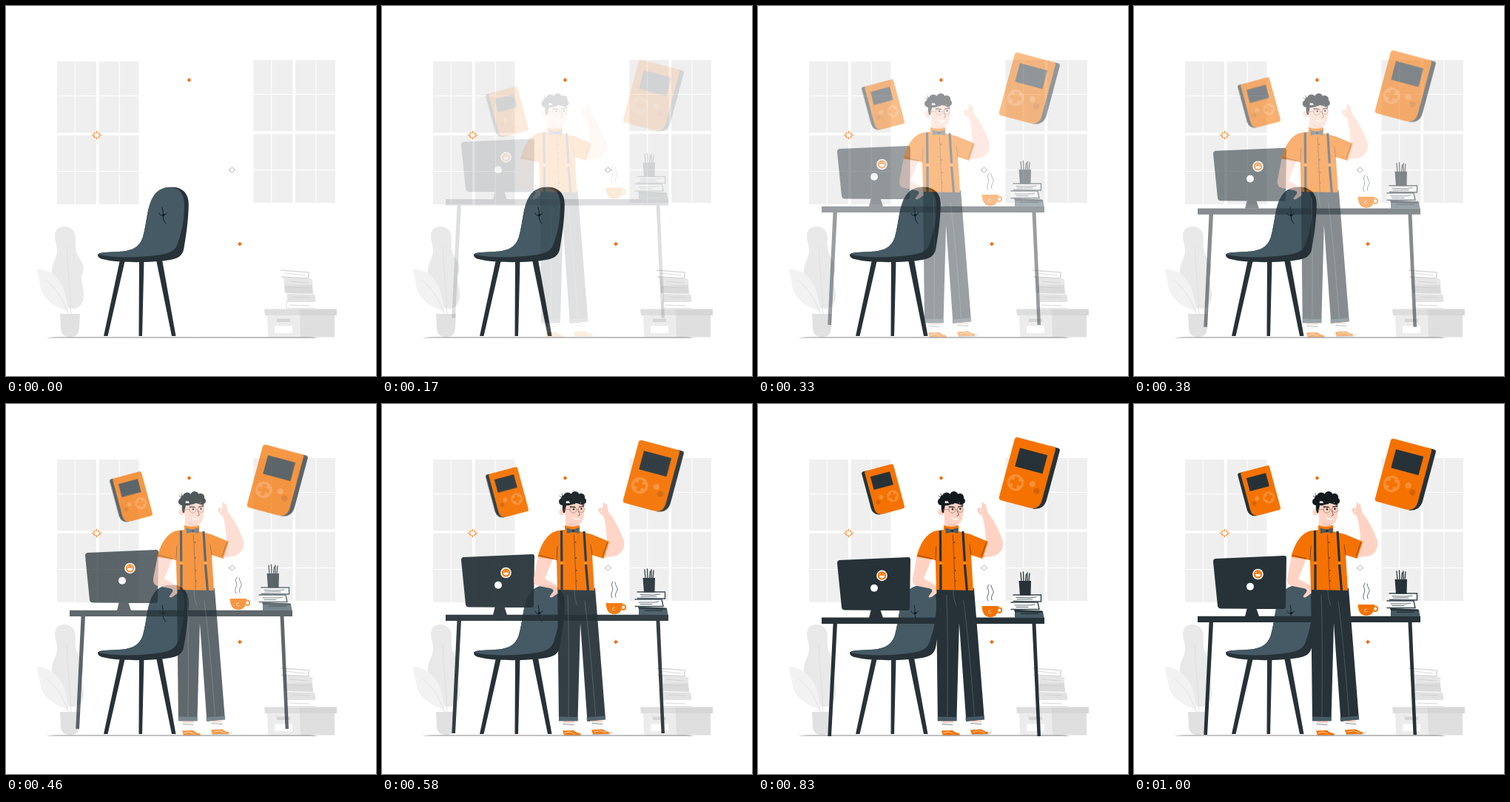
An HTML page for the animation above (1040 ms loop, 500 by 500 pixels).

```html
<!DOCTYPE html>
<html lang="en">
<head>
<meta charset="utf-8">
<title>Desk scene</title>
<style>
html, body { margin: 0; width: 100%; height: 100%; overflow: hidden; background: #fff; }
svg { display: block; width: 100vw; height: 100vh; }
.line { fill: none; stroke-linecap: round; stroke-linejoin: round; }
.ink { fill: #263238; }
.slate { fill: #455a64; }
.orange { fill: #f57200; }
.skin { fill: #ffd3c3; }
</style>
</head>
<body>
<svg viewBox="0 0 500 500">
<defs>
  <g id="window">
    <path fill="#efefef" d="M69 75H179.5V268H69Z"/>
    <path class="line" stroke="#fff" stroke-width="1.1" d="M93.2 75V268M153.3 75V268M69 121.5H180M69 223.5H180"/>
    <path class="line" stroke="#fff" stroke-width="3.6" d="M123.8 75V268M69 173H180"/>
  </g>
  <path id="star" fill="#f26500" d="M0-3.2Q.7-.7 3.2 0Q.7.7 0 3.2Q-.7.7-3.2 0Q-.7-.7 0-3.2Z"/>
  <g id="console">
    <path class="ink" d="M50 0H60Q63 0 63 3V73Q62 86 48 88Z"/>
    <path class="orange" d="M4 0H54Q57 0 57 3V74Q57 88 43 88H4Q0 88 0 84V4Q0 0 4 0Z"/>
    <rect class="ink" x="10" y="13" width="38.5" height="26"/>
    <circle cx="16.5" cy="59.8" r="11.3" fill="#f88f36"/>
    <path class="orange" d="M13.7 52H19.3V57H24.3V62.6H19.3V67.6H13.7V62.6H8.7V57H13.7Z"/>
    <circle cx="38.8" cy="55.9" r="4.2" fill="#f88f36"/>
    <circle cx="46.6" cy="63.6" r="4.2" fill="#d56200"/>
  </g>
</defs>

<!-- room -->
<use href="#window"/>
<use href="#window" x="265.5" y="-2"/>
<g>
  <path fill="#e9e9e9" d="M66 310C66 301 73 298 80 298C89 299 94 305 94 314C93 326 94 334 100 342C106 350 106 357 102 365C101 374 106 382 105 393C104 405 96 410 88 409C80 408 76 400 77 391C78 381 64 376 62 363C60 350 69 342 69 331C69 323 66 318 66 310Z"/>
  <path fill="#f2f2f2" d="M42 355C61 355 78 372 82 396L85 413C66 407 48 396 46 377Z"/>
  <path class="line" stroke="#dcdcdc" stroke-width=".7" d="M82 325C83 355 87 385 88 416M55 371C68 382 78 397 84 416"/>
  <path fill="#e1e1e1" d="M73 416H100L99 436Q98 447 89 447H84Q75 447 74 436Z"/>
</g>
<g>
  <path fill="#ececec" d="M353 417H398V447.500H354Z"/>
  <path fill="#dfdfdf" d="M397 417H444V447.500H398Z"/>
  <path fill="#dedede" d="M349 409.500H397V418H350Z"/>
  <path fill="#d6d6d6" d="M396 409.500H447V418H397Z"/>
  <path fill="#d5d5d5" d="M366 422.500H384V427H366Z"/>
  <path fill="#fff" d="M363 432.500H387V442H363Z"/>
  <path fill="#fff" stroke="#e2e2e2" d="M418 408.500H379V399.500H417"/>
  <path fill="#e2e2e2" d="M380 389L417 390 419 399H380Z"/>
  <path fill="#dadada" d="M376 377H414L415 389 377 388Z"/>
  <path fill="#e6e6e6" d="M375 366L414 369V377L376 378Z"/>
  <path fill="#fff" stroke="#d9d9d9" stroke-width="1.6" d="M371 357L409 360V368L372 366"/>
  <path class="line" stroke="#cfcfcf" stroke-width=".8" d="M377 361L404 364M384 372L408 374M381 380L409 381M387 393L411 394M383 404L410 405"/>
</g>
<path fill="#a5a5a5" d="M54 448.500Q64 447 80 447.200H410Q417 447.300 421 448.700Z"/>
<use href="#star" x="247.500" y="100"/>
<use href="#star" x="316" y="321.500"/>
<path id="burst" class="line" stroke="#f58a2c" stroke-width="1.1"/>
<path class="line" stroke="#777" stroke-width=".9" stroke-dasharray="1 1.7" d="M301.500 221.500L305.500 218 309.500 221.500 305.500 225Z"/>

<!-- chair -->
<g>
  <path class="ink" d="M154 343H161L137.500 446H132ZM180 343H186.500L184 446H179.500ZM203 343H211L229.500 446H224Z"/>
  <path class="ink" d="M124 336C126 332 140 333 152 332C172 331 181 325 185 312C191 291 190 271 200 256C207 246 217 244.500 226 244.800C239 245.500 247 254 246.800 268C246.500 290 243.500 309 240.500 327C239 338 232 341 222 343C199 347 160 347 140 344C129 342 124 341 124 336Z"/>
  <path class="slate" d="M125 336C129 332.500 140 333 152 332C172 331 181 325 185 312C191 291 190 271 200 256C207 246 216 245 224 245C234 246 240 253 241 266C241 290 238 304 232 321C228 333 218 335 203 337C180 340 148 341 125 336Z"/>
  <path class="line" stroke="#111d23" stroke-width="1" d="M211 272Q213 278 212 283Q212 290 216 294M207 280Q208 284 213 283L217 280"/>
  <circle cx="212.500" cy="282.500" r="1.700" fill="#111d23"/>
</g>

<!-- desk -->
<g id="desk">
  <path class="ink" d="M86 286.700H387V295H375.500L382 447H377.500L370.500 295H107L99 447H94.300L101.500 295H86Z"/>
  <path class="ink" d="M153 275H165L169 287H150ZM110 209L203 205Q206 205 206 208L205 274Q205 277 202 277L117 276.500Q113.500 276 113 273L107 213Q107 209.500 110 209Z"/>
  <circle cx="157" cy="246.800" r="5" fill="#fff"/>
  <circle cx="167.500" cy="230" r="7.300" fill="#fff"/>
  <circle class="orange" cx="167.500" cy="230" r="5.700"/>
  <path fill="#fff" d="M163.800 229.800H171.200Q170.800 233.600 167.500 233.600Q164.200 233.600 163.800 229.800Z"/>
  <path class="line" stroke="#fff" stroke-width=".8" d="M164.500 228L166 227.300M169 227.300L170.500 228"/>
  <circle cx="326" cy="276.800" r="3.200" fill="none" stroke="#f57200" stroke-width="2"/>
  <path class="orange" d="M302.700 271H325Q325 286 314 286Q303 286 302.700 271Z"/>
  <path class="line" stroke="#ffb377" stroke-width="1.200" d="M314.500 277Q311 277 311.500 279.500Q312 281.500 315 280.500"/>
  <path class="line" stroke="#37474f" stroke-width=".8" d="M311 264C307 258 314 254 311 249Q309 245 312 242M316 263C313 257 321 254 317 249Q315 245 315 243"/>
  <path class="slate" d="M347 276L385 278 386.500 287H347Z"/>
  <path class="ink" d="M346 276L384 277.500 385 280 347 279ZM355 280.500H379V282H355Z"/>
  <path fill="#fff" stroke="#37474f" stroke-width="1.500" d="M341.500 266H378L380 275.500H341.500"/>
  <path fill="#fff" stroke="#37474f" stroke-width="1.500" d="M344.500 256H382.500V265L345 264.500"/>
  <path class="line" stroke="#37474f" stroke-width=".8" d="M349 259.500L366 260L376 259M350 262H371M347 270H368L374 269M349 272.500H365"/>
  <path class="line" stroke="#263238" stroke-width="1.300" d="M356 238L355 226M359 238L358.500 225M361.500 238L362.500 228M364 238V226M366 238L367 227"/>
  <path class="ink" d="M352.500 237H369L368.500 256.500H354Z"/>
</g>

<!-- floating consoles -->
<g id="toys">
  <use href="#console" transform="translate(347.700 46) rotate(15)"/>
  <use href="#console" transform="translate(182.500 82.500) rotate(-15) scale(-.705 .705)"/>
</g>

<!-- man -->
<g id="man">
  <path class="skin" d="M247 427H262V434H247ZM286 426H300V433H286Z"/>
  <path fill="#fafafa" d="M246 431H262L263 442H246ZM285 430H301L302 441H286Z"/>
  <path class="line" stroke="#78868d" stroke-width=".9" d="M247 432.500L261 433.500M286 431.500L300 432.500"/>
  <path class="orange" d="M246 441.500L261 441Q264 444 270 445L271 447.500H248ZM285 440.500L300 439.500Q304 443 310 443.500L308 446H287Z"/>
  <path class="line" stroke="#ffd9bd" stroke-width=".9" d="M249 444.500L256 443L262 446M289 443L297 441.500L304 444.500"/>
  <path class="line" stroke="#8a969b" stroke-width=".7" d="M247 448H270M287 446.500L310 446Q313 445.500 313 443"/>

  <path class="ink" d="M239 249H290L304 426 279.500 429 270 296 266.500 428H241Z"/>
  <path class="slate" d="M241 422.500L266.700 423 266.500 428.500H241ZM278.500 423.500L303.600 421.500 304.300 426.500 279 428.500Z"/>
  <path class="line" stroke="#56686f" stroke-width=".7" d="M253 259Q255 310 254 422M276 266Q283 320 290.500 421M262 252Q262 264 266 272"/>

  <path class="skin" d="M213 205L207 236Q206 245 214 246L229 249Q235 250 233 254L228.500 260Q230 262.500 233 260.500L239.500 256V246L222 236 233 209Z"/>
  <path class="skin" d="M300 208L313 206C325 206 331 194 329 185C324 171 316 155 308 146L306 136Q304.500 133 303.500 136L302.500 133Q300.500 131.500 300.500 135L300 141Q295 139 294 143Q295 148 301 151Q305 162 306 186Z"/>
  <path fill="#fff" stroke="#eeb39e" stroke-width=".5" d="M296.500 143.500Q299 142 300.500 145Q299 148 296.500 143.500Z"/>

  <path class="orange" d="M249 164H269V172L285 176 309 186 301.500 209 286 204 289 252 239 251 238 211 212.500 206.500C216 193 224 173 241 171L249 170Z"/>
  <path class="line" stroke="#6f3a14" stroke-width=".8" d="M214.500 204.500L233 209M306.500 187L300 206M238 211L239 192M286 204L284 190M261.500 177L264.500 251"/>
  <g fill="#6f3a14">
    <circle cx="263.500" cy="187" r="1.100"/><circle cx="264" cy="208" r="1.100"/>
    <circle cx="264.500" cy="225" r="1.100"/><circle cx="264.800" cy="239" r="1.100"/>
  </g>
  <path class="line" stroke="#263238" stroke-width="3.200" style="stroke-linecap:butt" d="M244.500 171L244.800 212.500M245 217V251M275 172L277.500 212.500M277.500 217L280.500 252"/>
  <path class="line" stroke="#ffb26b" stroke-width="1" d="M243 215H247M275.500 215H279.500"/>

  <path class="skin" d="M247 134H273Q277 146 274 155Q272 162 266 163.500Q268 167 262 167.500Q251 168 250 164V152Z"/>
  <path class="orange" d="M249 164Q258 167 269 164.500L269.500 171H250Z"/>
  <path class="slate" d="M251.500 167.500L260 170 268.500 167V175L260.500 173 252 175Z"/>
  <circle class="ink" cx="260.500" cy="171.500" r="2"/>
  <circle class="skin" cx="245.500" cy="146" r="4.300"/>
  <path fill="#131a1e" d="M246 134H274L276 137Q268 136 264 132Q258 138 251 137L249 147H247Q245 141 246 134Z"/>
  <g fill="#131a1e">
    <circle cx="246" cy="132" r="5"/><circle cx="253" cy="125.500" r="6"/>
    <circle cx="263" cy="123.500" r="5.500"/><circle cx="271" cy="126" r="5.200"/>
    <circle cx="274" cy="131" r="4"/><circle cx="260" cy="130" r="5.500"/>
    <circle cx="248" cy="127" r="3.800"/><circle cx="267" cy="130" r="4.500"/>
  </g>
  <path class="line" stroke="#263238" stroke-width=".8" d="M242 124L244 126M245 121L246 124"/>
  <path class="line" stroke="#131a1e" stroke-width="1.700" d="M256.500 139L263 139.500M269 139L274.500 138"/>
  <g fill="none" stroke="#a77a69" stroke-width=".8">
    <circle cx="260.500" cy="143" r="4.300"/><circle cx="271.500" cy="142.500" r="4"/>
    <path d="M264.800 142.500L267.500 142M256 142.500L248 143"/>
  </g>
  <circle cx="261" cy="142.300" r="1.200" fill="#131a1e"/>
  <circle cx="271.500" cy="141.800" r="1.200" fill="#131a1e"/>
  <path class="line" stroke="#6b4439" stroke-width=".8" d="M267 144L269.500 150L267 151"/>
  <path class="line" stroke="#fff" stroke-width="1.300" d="M260 154Q264 157 269 155"/>
  <path class="line" stroke="#e6a48f" stroke-width=".7" d="M256 162Q261 164.500 266 163.500"/>
</g>
</svg>

<script>
const LOOP = 1040, STEP = 1000 / 24, LEAD = 35, SLIDE = 30;
const $ = id => document.getElementById(id);

const ray = (_, i) => {
  const a = i * Math.PI / 6, c = Math.cos(a), s = Math.sin(a), end = i % 3 ? 5.3 : 6.2;
  return `M${122.5 + 3.5 * c} ${174.5 + 3 * s}L${122.5 + end * c} ${174.5 + (end - 1) * s}`;
};
$('burst').setAttribute('d', Array.from({ length: 12 }, ray).join(''));

const bez = (t, a, b) => 3 * (1 - t) ** 2 * t * a + 3 * (1 - t) * t * t * b + t ** 3;

// Overshooting ease: cubic-bezier(.36, -.01, .5, 1.38)
function ease(x) {
  if (x >= 1) return 1;
  let lo = 0, hi = 1;
  for (let i = 0; i < 24; i++) {
    const mid = (lo + hi) / 2;
    if (bez(mid, .36, .5) < x) lo = mid; else hi = mid;
  }
  return bez(lo, -.01, 1.38);
}

function place(id, x, y, alpha) {
  $(id).setAttribute('transform', `translate(${x} ${y})`);
  $(id).setAttribute('opacity', alpha);
}

function draw(ms) {
  const step = Math.floor((ms % LOOP + 4.99) / STEP);
  const p = step < 2 ? 0 : ease((step * STEP + LEAD) / 1000);
  const gap = SLIDE * (1 - p), alpha = Math.max(0, Math.min(1, p));
  place('desk', 0, -gap, alpha);
  place('toys', 0, gap, alpha);
  place('man', -gap, 0, alpha);
}

const start = performance.now();
function tick() {
  draw(performance.now() - start);
  requestAnimationFrame(tick);
}
tick();
</script>
</body>
</html>
```
